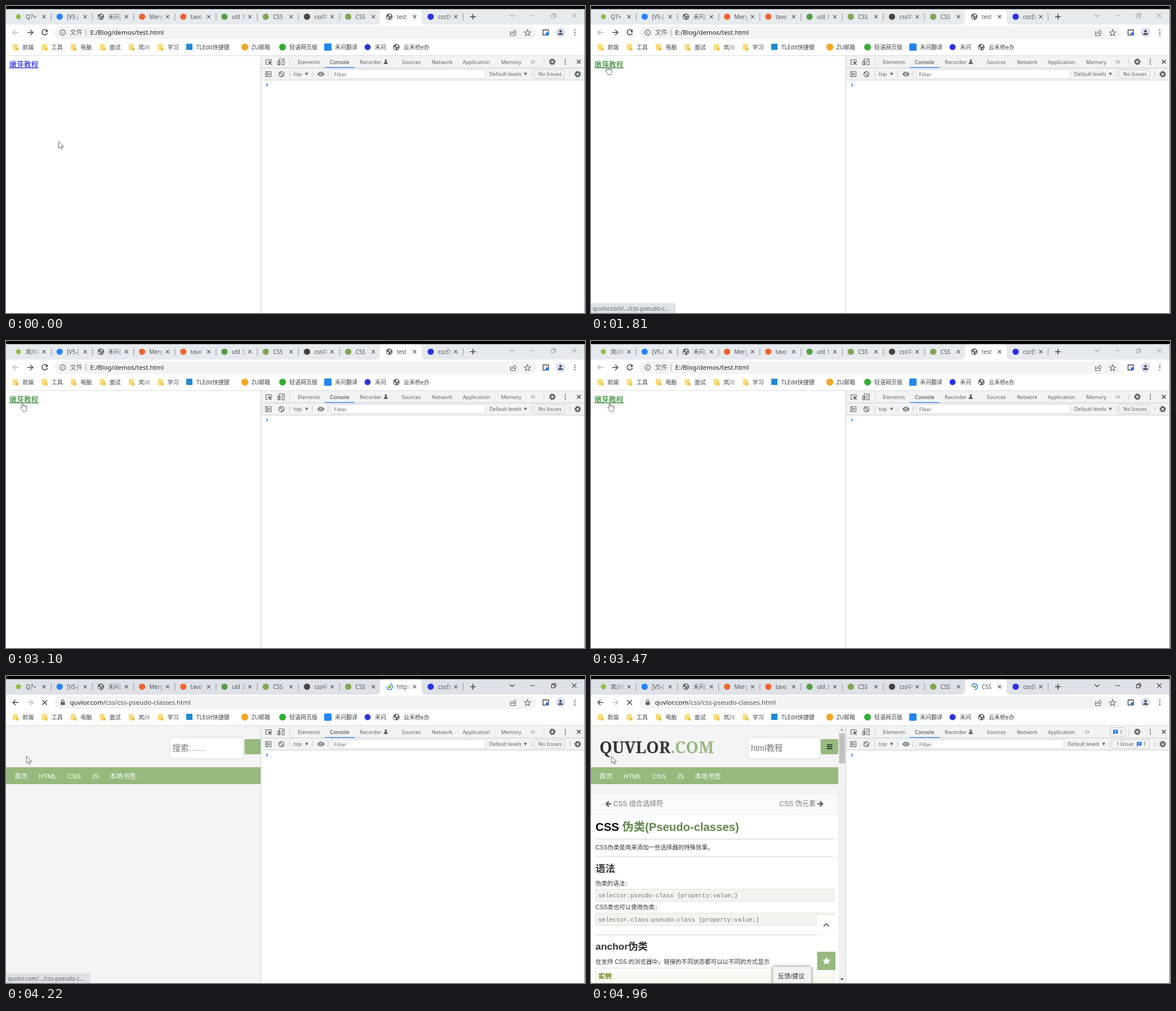
Write an HTML page that moves like this. It is 1028 px wide and 545 px high and loops after 5.01 s.

```html
<!DOCTYPE html>
<html lang="zh">
<head>
<meta charset="utf-8">
<style>
html, body { margin: 0; width: 100%; height: 100%; overflow: hidden; background: #fff; }
svg { display: block; width: 100%; height: 100%; font-family: "Noto Sans", "Noto Sans CJK SC", "Noto Sans CJK", sans-serif; }
.web { font-family: "Liberation Sans", "Noto Sans CJK SC", "Noto Sans CJK", sans-serif; }
.mono { font-family: "Liberation Mono", monospace; }
.serif { font-family: "Noto Serif", serif; font-weight: 900; }
text { white-space: pre; }
</style>
</head>
<body>
<svg id="stage" viewBox="0 0 1028 545" preserveAspectRatio="none"></svg>
<script>
const LOOP = 5010;
const INK = '#5f6368', GREEN = '#96b97d', BLUE = '#1a73e8';

const text = (x, y, s, size, fill = '#3c4043', extra = '') =>
  `<text x="${x}" y="${y}" font-size="${size}" fill="${fill}" ${extra}>${s}</text>`;
const rect = (x, y, w, h, fill, extra = '') =>
  `<rect x="${x}" y="${y}" width="${w}" height="${h}" fill="${fill}" ${extra}/>`;
const dot = (x, y, r, fill) => `<circle cx="${x}" cy="${y}" r="${r}" fill="${fill}"/>`;
const line = (d, stroke = INK, width = 1.2, extra = '') =>
  `<path d="${d}" fill="none" stroke="${stroke}" stroke-width="${width}" ${extra}/>`;
const shape = (d, fill = INK, extra = '') => `<path d="${d}" fill="${fill}" ${extra}/>`;
const ring = (x, y, r, width, extra = '') =>
  `<circle cx="${x}" cy="${y}" r="${r}" fill="none" stroke="${INK}" stroke-width="${width}" ${extra}/>`;
const group = (id, ...parts) => `<g id="${id}">${parts.join('')}</g>`;
const at = (x, y, ...parts) => `<g transform="translate(${x} ${y})">${parts.join('')}</g>`;
const cross = (x, y, r, color, width) =>
  line(`M${x - r} ${y - r}l${2 * r} ${2 * r}m0 ${-2 * r}l${-2 * r} ${2 * r}`, color, width);
const menuDots = (x, y) => [-4, 0, 4].map(d => dot(x, y + d, 1.15, INK)).join('');
const globe = (x, y) => at(x, y, dot(0, 0, 5.8, INK),
  shape('M-4.5-1L-1 1.5V4.5Q-4.5 3.5-4.5-1ZM0-4.5L3.5-2.5 1.5 0-1-1ZM2 1.5L4.3 1 2 4Z', '#fff'));
const gear = (x, y) => ring(x, y, 3.4, 2.6) + ring(x, y, 5, 1.6, 'stroke-dasharray="2.1 1.827"');

function tabStrip() {
  const icons = ['#8fbf45', '#2684ff', 0, '#f0652f', '#f0652f', '#539e43', '#7fa650', '#444', '#7fa650', 0, '#2932e1'];
  const titles = ['', '[V5-J', '禾问[', 'Merg', 'tavo', 'util 3', 'CSS ', 'css中', 'CSS ', '', 'css伪'];
  let out = rect(0, 5, 1028, 28, '#e7eaed', 'id="strip"') +
    shape('M656 33Q664 33 664 26V13Q664 6 671 6H731Q738 6 738 13V26Q738 33 746 33Z', '#fff');
  icons.forEach((color, i) => {
    const x = 22 + 73.2 * i;
    if (i !== 9) out += color ? dot(x, 19, i ? 5.6 : 4.5, color) : globe(x, 19);
    out += at(x + 13, 23, text(0, 0, titles[i], 10, 'url(#fade)', `id="title${i}"`));
    out += cross(67.5 + 73.1 * i, 19, 2.8, '#4a4d51', 1.2);
    if (i !== 8 && i !== 9) out += rect(80 + 73.1 * i, 13, 1, 13, '#8d9297');
  });
  return out +
    group('testIcon', globe(680.5, 19)) +
    group('spinner', dot(681, 19, 2.8, '#8bb56b'),
      line('M681 13.8A5.2 5.2 0 1 1 675.8 19', BLUE, 1.4, 'id="arc"')) +
    line('M824 19h10M829 14v10', '#3c4043', 1.5) +
    group('windowButtons',
      line('M894.5 15l4 4 4-4M931 17h8M968.5 15.5h5.5v5.5h-5.5zM970.5 15.5v-2h5.5v5.5h-2', 'inherit', 1.1),
      cross(1009, 17, 3.8, 'inherit', 1.1));
}

function toolbar() {
  let out = rect(0, 33, 1028, 55, '#fff') +
    rect(86, 36, 855, 22.5, '#f1f3f4', 'rx="11.2"') +
    line('M22 47H12.5M17 42.2L12.2 47L17 51.8', INK, 1.5, 'id="back"') +
    line('M38 47H47.5M43 42.2L47.8 47L43 51.8', INK, 1.5, 'id="forward"') +
    group('localBar',
      line('M72.8 43.6A4.8 4.8 0 1 0 73.6 48', '#45484c', 1.6), shape('M74 41.5V46.3H69.2Z', '#45484c'),
      ring(100.6, 47, 4.8, 1.2), line('M100.6 46.5v3M100.6 44v1.2'),
      text(113.5, 51.3, '文件', 11.2, INK), rect(141.5, 41, 1, 12, '#9a9da1'),
      text(149.5, 51.2, 'E:/Blog/demos/test.html', 11.4, '#202124')) +
    group('remoteBar', cross(68.5, 47, 4.2, '#45484c', 1.6),
      rect(97, 46, 7.5, 5.5, INK, 'rx="1"'), line('M98.5 46v-1.5a2.2 2.2 0 0 1 4.4 0v1.5'),
      text(113.5, 51.2, '<tspan fill="#202124">quvlor.com</tspan>/css/css-pseudo-classes.html', 11.5, '#505459')) +
    line('M897 45.5h-1.5v7h9v-3M897.5 49.5q1-4.5 5.5-4.5v-2.5l3.5 4-3.5 3.5v-2.5q-4 0-5.5 2z', INK, 1) +
    line('M926 42l1.5 3.7 3.9.3-3 2.6 1 3.9-3.4-2.1-3.4 2.1 1-3.9-3-2.6 3.9-.3z', INK, 1.1) +
    line('M953.5 42.5h9.5v9h-9.5z', '#3c4043', 1.4) + rect(958.5, 47, 5, 5, BLUE) +
    dot(984.5, 47, 8.5, '#d9deea') + dot(984.5, 44.7, 2.2, '#3f4a60') +
    shape('M980 51.3Q980 48 984.5 48T989 51.3Z', '#3f4a60') + menuDots(1010, 47);

  ['前端', '工具', '电脑', '面试', '岚川', '学习'].forEach((name, i) => {
    const x = 12 + 51.5 * i;
    out += rect(x, 67.5, 9, 11, '#fbdc79', 'rx="1"') + rect(x + 6, 74, 4, 5, '#edbd45', 'rx="1"') +
      text(x + 17.3, 77, name, 10);
  });
  out += rect(320, 67, 11, 11, '#1f8ad2') + text(338, 77, 'TLEdit快捷键', 10);
  out += dot(424, 73, 6.2, '#f5a623') + text(436, 77, 'ZU邮箱', 10);
  out += dot(491, 73, 6, '#2dae2f') + text(503, 77, '轻语网页版', 10);
  out += rect(565, 66.5, 13, 13, '#2186ee', 'rx="1.5"') + text(584, 77, '禾问翻译', 10);
  out += dot(642, 73, 5.4, '#2932e1') + text(655, 77, '禾问', 10);
  return out + globe(693, 73) + text(706, 77, '云禾桥e办', 10);
}

function devtools() {
  const bubble = (x, y) => shape(`M${x} ${y}h8.5v6.5h-6l-2.5 2z`, BLUE) +
    line(`M${x + 2} ${y + 2.3}h4.5m-4.5 2h3`, '#fff', .8);
  const badge = (x, y, w) => rect(x, y, w, 15.5, '#f1f3f4', 'stroke="#cdd0d5" rx="2"');
  const tab = (x, s, fill = INK) => text(x, 102.8, s, 9.15, fill);
  const label = (x, s) => text(x, 124.3, s, 9.05, INK);
  const down = x => shape(`M${x} 118.5h5.5l-2.75 5z`);
  const divider = (x, y) => rect(x, y, 1, 11, '#cacdd1');
  const more = x => line(`M${x} 96.5l2.8 2.7-2.8 2.7m4-5.4l2.8 2.7-2.8 2.7`, INK, 1);
  return rect(453, 88, 575, 457, '#fff') + rect(453, 88, 575, 44, '#f1f3f4') +
    rect(0, 87.5, 1028, 1, '#d5d8dc') + rect(453, 109.5, 575, 1, '#cacdd1') + rect(453, 131, 575, 1, '#cacdd1') +
    line('M471 99.5v-4h-9.5v8h4', INK, 1.1) + shape('M465.5 97.5l7 3-3 1 2.5 2.5-1 1-2.5-2.5-1 2.5z') +
    line('M485 104v-10h9v2M482.5 98h4v6.5h-4zM490 97h4v7.5h-4z', INK, 1.1) + divider(503.5, 94) +
    tab(518, 'Elements') + tab(575, 'Console', '#303438') + rect(566, 108.6, 53, 1.2, BLUE) +
    tab(628, 'Recorder') + shape('M672.5 95h4v1h-.8v2.5l2.8 4.5h-8.5l2.8-4.5V96h-.3z') +
    tab(703, 'Sources') + tab(756, 'Network') + tab(811, 'Application') +
    gear(970, 99) + menuDots(993, 99) + cross(1017, 99, 3.3, '#3c4043', 1.3) + divider(954.5, 94) +
    line('M461 116.5h9.5v9h-9.5zM463.5 116.5v9', INK, 1.1) + shape('M465.5 118.5l3.5 2.5-3.5 2.5z') +
    ring(489, 121, 4.5, 1.3) + line('M486 118l6.5 6.5', INK, 1.3) +
    divider(503.5, 115) + label(511, 'top') + down(531) + divider(543.5, 115) +
    shape('M553 121Q559 112.5 565.5 121Q559 129 553 121Z') + dot(559.2, 121, 2.8, '#f1f3f4') + dot(559.2, 121, 1.5, INK) +
    divider(571.5, 115) +
    rect(578.5, 113, 273, 15.5, '#fff', 'id="filter" stroke="#d5d8dc"') + text(582.5, 124.5, 'Filter', 9.3, INK) +
    gear(1015, 121) + divider(1000.5, 115) + line('M462 137.5l3 2.7-3 2.7', '#367cf1', 1.3) +
    group('noIssues', tab(879, 'Memory'), more(932), label(858, 'Default levels'), down(919.5),
      divider(933, 115), badge(937.5, 113, 54), label(945, 'No Issues')) +
    group('oneIssue', more(877.5), badge(922, 91.5, 27), bubble(927, 95.5), tab(938.5, '1'),
      label(846, 'Default levels'), down(907.5), divider(919, 115),
      badge(924.5, 113, 67), label(932.5, '1 Issue:'), bubble(969, 117), label(980.5, '1')) +
    rect(452, 88, 1, 457, '#cacdd1');
}

function site() {
  const nav = [[15, '首页'], [58, 'HTML'], [109, 'CSS'], [152, 'JS'], [184, '本地书签']];
  const rule = (y, color = '#ccc') => rect(8, y, 423, 1, color);
  const bold = 'font-weight="700"';
  const body = (y, s) => text(8, y, s, 10.45, '#333');
  const code = (y, s) => rect(8.5, y, 423, 21.5, '#f5f3ef', 'stroke="#deddd8"') +
    text(13, y + 14.5, s, 10.6, '#777', 'class="mono"');
  const search = (x, w, hint) => rect(x - 3, 107, w + 6, 42, '#ededed', 'rx="5"') +
    rect(x, 110.5, w, 35, '#fff', 'rx="3"') + text(x + 3.5, 132.5, hint, 14.5, '#757575');
  return `<g id="site" class="web">` + rect(0, 88, 452, 457, '#f4f4f4') + rect(0, 162, 452, 30, GREEN) +
    nav.map(([x, s]) => text(x, 182, s, 11.7, '#fff')).join('') +
    group('searchLoading', search(292, 128, '搜索……'), rect(423.5, 112, 29, 27, GREEN, 'rx="3"')) +
    group('article', rect(0, 209, 439, 336, '#fff'), rect(0, 208.5, 438, 37.5, '#fafafa', 'stroke="#e9e9e9"'),
      text(15, 137, 'QUVLOR<tspan fill="#96b97d">.COM</tspan>', 28.8, '#333', 'class="serif"'),
      search(280.5, 124.5, 'html教程'), rect(408, 112, 31, 27, GREEN, 'rx="3"'),
      line('M419 122h9.5m-9.5 3.4h9.5m-9.5 3.4h9.5', '#222', 1.7),
      line('M36 227H27m4.5-4.5L27 227l4.5 4.5M402 227h9m-4.5-4.5L411 227l-4.5 4.5', '#666', 2.5),
      text(39.5, 231, 'CSS 组合选择符', 12.1, '#777'), text(334.5, 231, 'CSS 伪元素', 12.1, '#777'),
      text(8, 275, 'CSS <tspan fill="#64854c">伪类(Pseudo-classes)</tspan>', 20.3, '#000', bold),
      rule(289), body(308, 'CSS伪类是用来添加一些选择器的特殊效果。'), rule(320, '#d8d8d8'),
      text(8, 347.5, '语法', 17.4, '#333', bold), body(372, '伪类的语法：'),
      code(378.5, 'selector:pseudo-class {property:value;}'), body(414, 'CSS类也可以使用伪类：'),
      code(421, 'selector.class:pseudo-class {property:value;}'), rule(459),
      text(8, 486, 'anchor伪类', 17.4, '#333', bold),
      body(511, '在支持 CSS 的浏览器中，链接的不同状态都可以以不同的方式显示'),
      rect(8.5, 518.5, 423, 40, 'url(#example)', 'stroke="#dcdcd4"'), text(13, 537, '实例', 11.7, '#617f10', bold),
      rect(401.5, 425, 32.5, 97, '#fff'), rect(401.5, 457, 32.5, 1, '#f1f1f1'),
      line('M413 444.5l5-5 5 5', '#666', 1.8), rect(401.5, 489.5, 32.5, 32.5, GREEN),
      shape('M418 498.5l2.2 4.7 5 .6-3.7 3.5 1 5-4.5-2.5-4.5 2.5 1-5-3.7-3.5 5-.6z', '#fff'),
      rect(323.5, 516.5, 67, 40, '#f2f2f2', 'filter="url(#shadow)"'), text(332, 536.5, '反馈/建议', 11.1, '#333'),
      rect(439, 88, 13, 457, '#f1f1f1'), rect(440.5, 102, 10.5, 53, '#c1c1c1'),
      shape('M442.5 97l3-3.5 3 3.5z', '#a3a3a3'), shape('M442.5 537l3 3.5 3-3.5z', '#505050')) + '</g>';
}

const outline = 'stroke="#444" stroke-width=".8"';
const stage = document.getElementById('stage');
stage.innerHTML = `<defs>
  <linearGradient id="fade" gradientUnits="userSpaceOnUse" x1="15" y1="0" x2="26" y2="0">
    <stop stop-color="#4c5054"/><stop offset="1" stop-color="#4c5054" stop-opacity="0"/></linearGradient>
  <linearGradient id="example" x2="0" y2="1"><stop stop-color="#fff"/><stop offset="1" stop-color="#eff2dd"/></linearGradient>
  <filter id="shadow" x="-20%" y="-30%" width="140%" height="160%">
    <feDropShadow dx="0" dy="0" stdDeviation="3" flood-opacity=".6"/></filter></defs>` +
  rect(0, 0, 1028, 545, '#fff') +
  group('linkPage', text(6, 108.2, '嫩芽教程', 12.9, 'currentColor'), rect(6, 109.3, 52, 1.1, 'currentColor')) +
  site() + tabStrip() + toolbar() + devtools() +
  group('status', shape('M0 527.5H147Q150 527.5 150 530.5V545H0Z', '#dee1e6'),
    text(3, 541.3, 'quvlor.com/.../css-pseudo-c...', 10, INK)) +
  group('cursor',
    shape('M.5 .5V12.8L3.4 10.1 5.4 14.4 7.2 13.6 5.4 9.4H9.3Z', '#fff', `id="pointer" ${outline}`),
    group('hand', at(-4, 0,
      shape('M3 1.5Q4.2-.3 5.2 1.5V6Q7 5 7.6 6.6 9.4 5.8 10 7.4 12 7 12 9V12Q12 14.5 10.5 17H5Q4 14 .6 10.5 .4 8.6 3 10Z', '#fff', outline),
      line('M5.2 6v3M7.6 7v2.5M10 8v2', '#444', .7)))) +
  rect(0, 0, 1028, 5.5, '#000') + rect(1027, 5, 1, 540, '#777');

const el = id => document.getElementById(id);
const show = (id, on) => { el(id).style.display = on ? '' : 'none'; };
const set = (id, name, value) => el(id).setAttribute(name, value);

// time, x, y of the pointer tip
const path = [
  [650, 93, 240], [970, 31, 138], [1250, 30, 112], [1710, 29, 105], [2689, 29, 105], [2690, 29, 108],
  [3200, 29, 108], [3470, 33, 108], [3640, 33, 108], [3750, 35, 131], [3900, 36, 142]
];
function pointerAt(t) {
  const i = path.findIndex(p => p[0] > t);
  if (i === 0) return path[0].slice(1);
  if (i < 0) return path.at(-1).slice(1);
  const [t0, x0, y0] = path[i - 1], [t1, x1, y1] = path[i];
  const k = (t - t0) / (t1 - t0);
  return [x0 + (x1 - x0) * k, y0 + (y1 - y0) * k];
}

function draw(t) {
  const within = (a, b = LOOP) => t >= a && t < b;
  const hover = within(1250, 3690), loading = within(3850), remote = within(3950), ready = within(4500);
  const focused = within(3560), issue = within(4650);

  el('title0').textContent = within(650, 1650) || within(2690, 3690) || within(4690) ? '岚川Q' : 'Q7+';
  el('title9').textContent = ready ? 'CSS ' : loading ? 'https' : 'test';
  set('strip', 'fill', focused ? '#dee1e6' : '#e7eaed');
  set('windowButtons', 'stroke', focused ? '#333' : '#a0a3a7');
  show('testIcon', !loading);
  show('spinner', loading);
  set('arc', 'transform', `rotate(${(t - 4220) * .36} 681 19)`);

  set('back', 'stroke', remote ? '#45484c' : '#b8babd');
  set('forward', 'stroke', remote ? '#b8babd' : '#45484c');
  show('localBar', !remote);
  show('remoteBar', remote);

  el('linkPage').style.color = hover ? '#1a7a1a' : '#1414d2';
  show('linkPage', !remote);
  show('site', within(4080));
  show('searchLoading', !ready);
  show('article', ready);
  show('status', within(1300, 3100) || within(3880, 4500));

  show('oneIssue', issue);
  show('noIssues', !issue);
  set('filter', 'width', issue ? 261 : 273);

  const [x, y] = pointerAt(t);
  set('cursor', 'transform', `translate(${x} ${y})`);
  show('hand', hover);
  show('pointer', !hover);
}

const start = performance.now();
function tick() {
  draw((performance.now() - start) % LOOP);
  requestAnimationFrame(tick);
}
tick();
</script>
</body>
</html>
```
